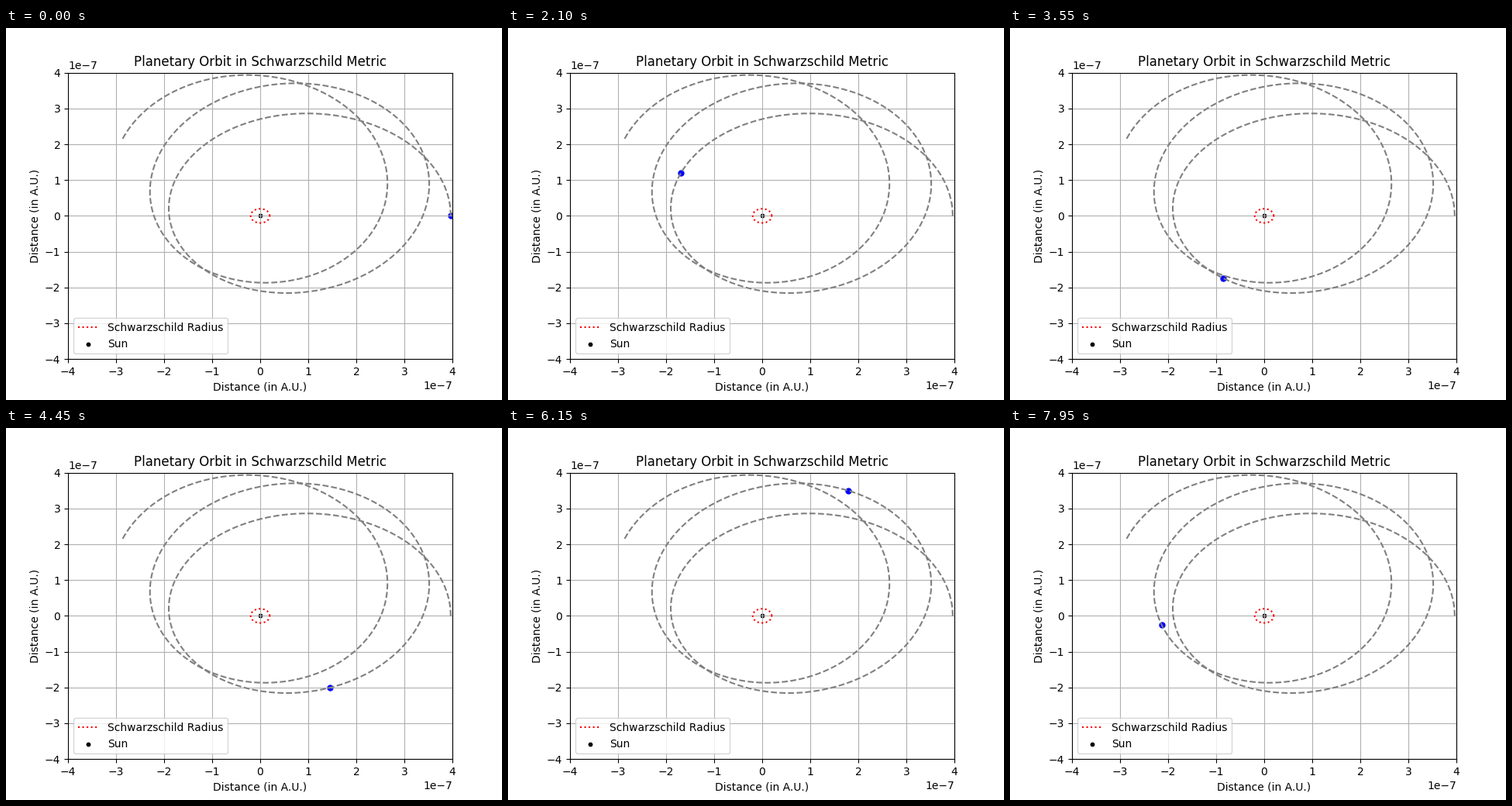
Recreate the animation shown at these times as a matplotlib script. Size 640x480 px, loop 8000 ms.

```python
import numpy as np
import matplotlib.pyplot as plt
from matplotlib.animation import FuncAnimation

UNIT = 1e-7          # axis scale in A.U.
RS = 0.1974          # Schwarzschild radius, in UNIT
R_FAR, R_NEAR = 3.965, 1.857
STEP = 0.01          # angle step in radians
STEPS = 1508
STRIDE = 6           # integration steps per frame
FRAMES = 160


def integrate_orbit():
    """RK4 solution of u'' = a - u + 1.5 rs u^2, with u = 1/r."""
    u1, u2 = 1 / R_FAR, 1 / R_NEAR
    u3 = 1 / RS - u1 - u2
    a = RS * (u1 * u2 + u1 * u3 + u2 * u3) / 2

    def slope(s):
        return np.array([s[1], a - s[0] + 1.5 * RS * s[0] ** 2])

    state = np.array([u1, 0.0])
    us = [u1]
    for _ in range(STEPS):
        k1 = slope(state)
        k2 = slope(state + STEP / 2 * k1)
        k3 = slope(state + STEP / 2 * k2)
        k4 = slope(state + STEP * k3)
        state = state + STEP / 6 * (k1 + 2 * k2 + 2 * k3 + k4)
        us.append(state[0])
    phi = STEP * np.arange(STEPS + 1)
    r = UNIT / np.array(us)
    return r * np.cos(phi), r * np.sin(phi)


x, y = integrate_orbit()
angle = np.linspace(0, 2 * np.pi, 100)

fig, ax = plt.subplots(figsize=(6.4, 4.8), dpi=100)
ax.plot(x, y, "--", color="gray")
ax.plot(RS * UNIT * np.cos(angle), RS * UNIT * np.sin(angle), ":",
        color="red", label="Schwarzschild Radius")
ax.scatter([0], [0], s=10, color="black", label="Sun")
planet = ax.scatter([x[0]], [y[0]], s=25, color="blue")

ax.set_xlim(-4 * UNIT, 4 * UNIT)
ax.set_ylim(-4 * UNIT, 4 * UNIT)
ax.set_xlabel("Distance (in A.U.)")
ax.set_ylabel("Distance (in A.U.)")
ax.set_title("Planetary Orbit in Schwarzschild Metric")
ax.grid(True)
ax.legend(loc="lower left")


def update(i):
    k = i * STRIDE
    planet.set_offsets([[x[k], y[k]]])
    return (planet,)


anim = FuncAnimation(fig, update, frames=FRAMES, interval=50, repeat=True)
plt.show()
```
